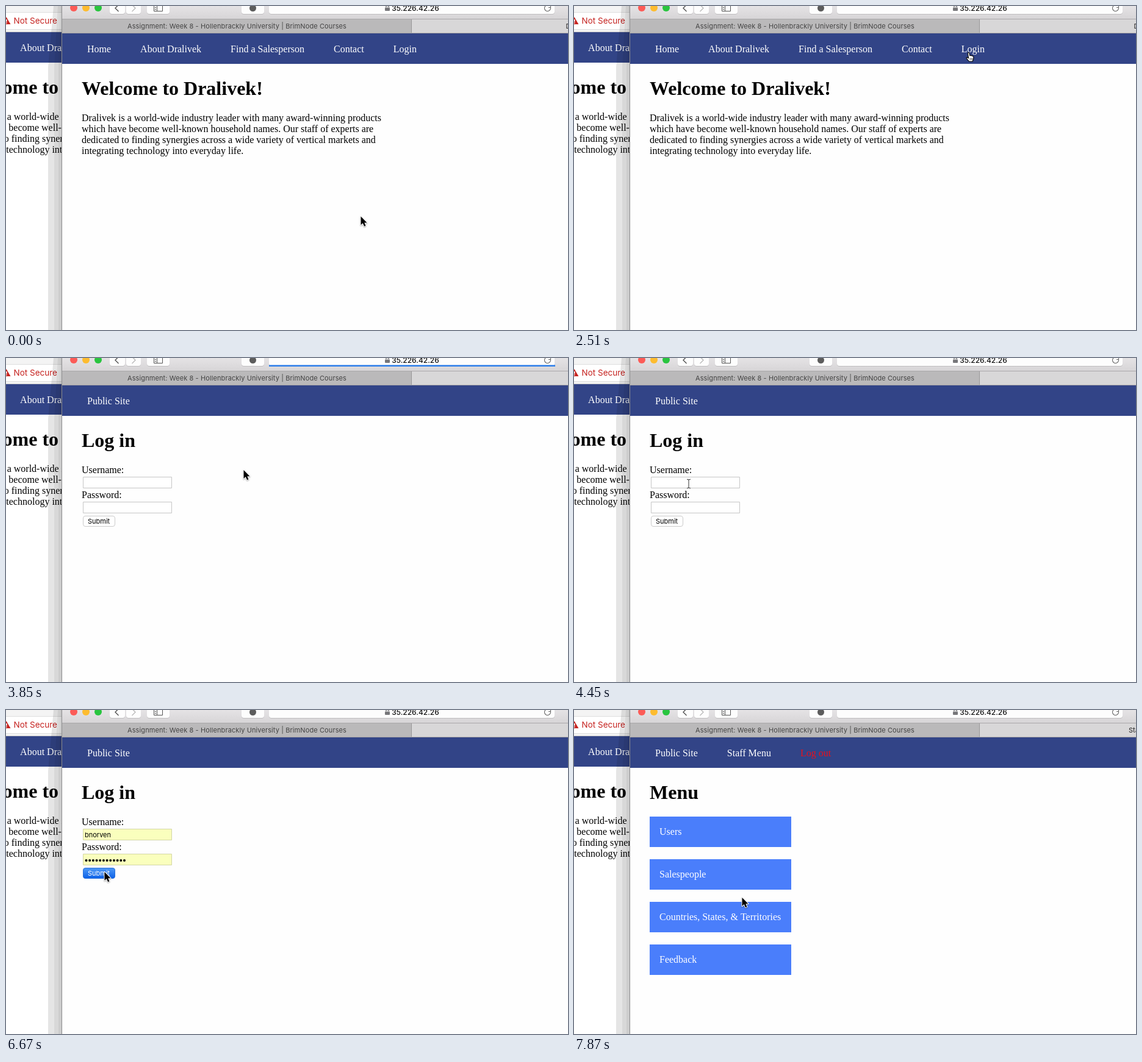
Animation of 921 by 532 pixels, one loop 8 s. Source, as an HTML page with a canvas:

```html
<!DOCTYPE html>
<html lang="en">
<head>
<meta charset="utf-8">
<title>Login walkthrough</title>
<style>
html, body { margin: 0; width: 100%; height: 100%; overflow: hidden; background: #fff; }
canvas { display: block; width: 921px; height: 532px; }
</style>
</head>
<body>
<canvas id="stage" width="921" height="532"></canvas>
<script>
const c = document.getElementById('stage').getContext('2d');
const LOOP = 8000;
const SERIF = '"Liberation Serif", "Times New Roman", serif';
const SANS = 'Inter, Roboto, sans-serif';
const NAVY = '#324487';
const USER = 'bnorven';

const intro = [
  'Dralivek is a world-wide industry leader with many award-winning products',
  'which have become well-known household names. Our staff of experts are',
  'dedicated to finding synergies across a wide variety of vertical markets and',
  'integrating technology into everyday life.'
];
const homeLinks = ['Home', 'About Dralivek', 'Find a Salesperson', 'Contact', 'Login'];

// pointer moves: first step, last step, number of steps, end point
const moves = [
  [740, 1190, 4, 635, 226],
  [1490, 2220, 6, 645.5, 79],
  [3260, 3850, 5, 389.5, 184],
  [4000, 4450, 4, 188, 206.5],
  [5190, 5330, 2, 183.5, 228],
  [5930, 6220, 3, 161.5, 266],
  [6820, 7270, 4, 275.5, 308]
];
// loading bar: time, width, opacity
const barSteps = [
  [0, 0, 0], [2960, 30, 1], [3260, 47, 1], [3400, 65, 1], [3700, 469, 1],
  [4150, 469, .5], [4300, 0, 0], [6820, 30, 1], [7120, 47, 1], [7270, 65, 1],
  [7570, 469, 1], [7720, 469, .5], [7870, 0, 0]
];

const within = (t, a, b) => t >= a && t < b;

function rect(x, y, w, h, fill) {
  c.fillStyle = fill;
  c.fillRect(x, y, w, h);
}

function box(x, y, w, h, r, fill, line) {
  c.beginPath();
  c.roundRect(x, y, w, h, r);
  c.fillStyle = fill;
  c.fill();
  if (line) {
    c.strokeStyle = line;
    c.lineWidth = 1;
    c.stroke();
  }
}

function dot(x, y, r, fill) {
  c.beginPath();
  c.arc(x, y, r, 0, Math.PI * 2);
  c.fillStyle = fill;
  c.fill();
}

function line(points, color, width = 1) {
  c.beginPath();
  points.forEach(([x, y], i) => i ? c.lineTo(x, y) : c.moveTo(x, y));
  c.strokeStyle = color;
  c.lineWidth = width;
  c.stroke();
}

function text(s, x, y, font, color = '#000', align = 'left') {
  c.font = font;
  c.fillStyle = color;
  c.textAlign = align;
  c.fillText(s, x, y);
}

const body = (s, x, y, color) => text(s, x, y, '16px ' + SERIF, color);
const title = s => text(s, 124, 146, 'bold 32px ' + SERIF);
const ui = (s, x, y, size, color) => text(s, x, y, size + 'px ' + SANS, color);

function fade(top, bottom, from, to) {
  const g = c.createLinearGradient(0, top, 0, bottom);
  g.addColorStop(0, from);
  g.addColorStop(1, to);
  return g;
}

function nav(links) {
  rect(92, 45, 829, 50, NAVY);
  let x = 133;
  for (const s of links) {
    body(s, x, 76, s === 'Log out' ? '#e8101c' : '#fff');
    x += c.measureText(s).width + 48;
  }
}

function home() {
  nav(homeLinks);
  title('Welcome to Dralivek!');
  intro.forEach((s, i) => body(s, 124, 189 + 18 * i));
}

function backWindow() {
  c.save();
  c.beginPath();
  c.rect(0, 0, 92, 532);
  c.clip();
  rect(0, 0, 92, 532, '#fff');
  c.save();
  c.translate(-197, -2);
  rect(197, 45, 92, 50, NAVY);
  home();
  c.restore();
  rect(0, 0, 92, 43, '#f4f4f4');
  rect(0, 10, 92, 29, '#dedede');
  rect(0, 11, 92, 27, '#fff');
  rect(0, 42, 92, 1, '#d0d0d0');
  c.beginPath();
  c.moveTo(0.5, 18);
  c.lineTo(7.5, 30);
  c.lineTo(-6.5, 30);
  c.fillStyle = '#c5221f';
  c.fill();
  rect(0, 22, 1.5, 4, '#fff');
  rect(0, 27, 1.5, 1.5, '#fff');
  ui('Not Secure', 12.5, 29, 13.5, '#c5221f');

  // stepped window shadow
  for (const [top, low, a] of [[78, 69, .1], [85, 79, .06], [89, 86, .05]]) {
    c.beginPath();
    c.moveTo(top, 0);
    c.lineTo(low, 100);
    c.lineTo(low, 532);
    c.lineTo(92, 532);
    c.lineTo(92, 0);
    c.fillStyle = `rgba(0,0,0,${a})`;
    c.fill();
  }
  c.restore();
}

function lock(x, y) {
  box(x - 4, y - 1, 8, 5.5, 1, '#77777a');
  c.beginPath();
  c.arc(x, y - 1.5, 2.5, Math.PI, 0);
  c.strokeStyle = '#77777a';
  c.lineWidth = 1.3;
  c.stroke();
}

function reload(x, y) {
  c.beginPath();
  c.arc(x, y, 5, -.3, Math.PI * 1.6);
  c.strokeStyle = '#6a6a6a';
  c.lineWidth = 1.1;
  c.stroke();
  line([[x + 1.5, y - 1], [x + 5, y - 1], [x + 5, y - 5]], '#6a6a6a', 1.1);
}

function chrome(t) {
  rect(92, 0, 829, 22, fade(0, 22, '#e5e3e5', '#d6d4d6'));
  ['#fc5b57', '#fdbc2f', '#29c53f'].forEach((col, i) => dot(111 + 20 * i, 3, 6, col));
  for (const [x, w] of [[170, 25], [197, 24], [231, 37], [386, 37], [431, 468]]) {
    box(x, -9, w, 23, 4, '#bfbdbf');
    box(x, -9, w, 22, 4, '#fdfdfd');
  }
  line([[184.5, -2], [179, 3.5], [184.5, 9]], '#555', 1.4);
  line([[206.5, -2], [212, 3.5], [206.5, 9]], '#bbb', 1.4);
  line([[242.5, -2], [242.5, 8.5], [256.5, 8.5], [256.5, -2]], '#555');
  line([[247.5, -2], [247.5, 8.5]], '#555');
  line([[244, 2.5], [246, 2.5]], '#555');
  line([[244, 5.5], [246, 5.5]], '#555');
  dot(404.5, 3.5, 5.5, '#5c5c5c');
  lock(625, 3.5);
  text('35.226.42.26', 671, 8, '500 12px ' + SANS, '#111', 'center');

  if (within(t, 2960, 3850) || within(t, 6820, 7720)) {
    line([[882.5, -1], [892.5, 9]], '#666', 1.1);
    line([[892.5, -1], [882.5, 9]], '#666', 1.1);
  } else reload(887.5, 3.5);

  const [, w, alpha] = barSteps.filter(s => s[0] <= t).pop();
  c.globalAlpha = alpha;
  rect(431, 11.5, w, 2.5, '#2b7de9');
  c.globalAlpha = 1;

  rect(92, 21, 829, 1, '#aaa8aa');
  rect(92, 22, 573, 22, '#bab9ba');
  rect(665, 22, 256, 22, '#d8d7d8');
  rect(664, 22, 1, 22, '#989798');
  rect(92, 44, 829, 1, '#a3a2a5');
  c.letterSpacing = '0.1px';
  text('Assignment: Week 8 - Hollenbrackly University | BrimNode Courses',
    378.5, 37, '11px ' + SANS, '#444', 'center');
  c.letterSpacing = '0px';
  if (t < 3400) ui('Dralivek', 917.5, 37, 11, '#222');
  if (t >= 7420) ui('Staff', 909, 37, 11, '#222');
}

function field(y, filled) {
  box(126.5, y + .5, 145, 18, 0, filled ? '#faffbd' : '#fff', filled ? '#d3d6a6' : '#c6c6c6');
}

function bigKey(x, y) {
  c.fillStyle = fade(y, y + 30, '#f4f4f4', '#a9abad');
  c.beginPath();
  c.arc(x, y + 8, 8, 0, Math.PI * 2);
  c.fill();
  c.beginPath();
  c.moveTo(x - 3, y + 14);
  c.lineTo(x + 3, y + 14);
  c.lineTo(x + 3, y + 26);
  c.lineTo(x, y + 29);
  c.lineTo(x - 3, y + 26);
  c.fill();
  box(x - 3.5, y + 2.5, 7, 3.5, 1.7, '#6f7d8f');
  rect(x, y + 15, 1, 11, '#85888c');
  rect(x + 3, y + 20, 2, 2, '#c4c6c8');
  rect(x + 3, y + 24, 2, 2, '#b4b6b8');
}

function suggestions(lit) {
  c.save();
  c.shadowColor = 'rgba(0,0,0,.3)';
  c.shadowBlur = 10;
  c.shadowOffsetY = 3;
  box(126, 216, 146, 70.5, [0, 0, 5, 5], '#ececec');
  c.restore();
  box(125.5, 215.5, 147, 71, [0, 0, 5, 5], '#ececec', '#c2c2c2');
  if (lit) rect(126, 216, 146, 43, '#4697fc');
  bigKey(150, 223);
  ui(USER, 168, 234, 12.5, lit ? '#fff' : '#2b2b2b');
  ui('From this site', 168, 250, 11, lit ? '#eaf3ff' : '#777');
  ui('Other Passwords...', 142, 277, 12.5, '#333');
}

function login(t) {
  const filled = t >= 5630, pressed = t >= 6670;
  nav(['Public Site']);
  title('Log in');
  body('Username:', 124, 189);
  body('Password:', 124, 230);
  if (within(t, 4890, 6670)) box(123.5, 192.5, 151, 24, 3, '#b9d9fb');
  field(195, filled);
  field(236, filled);
  if (filled) {
    ui(USER, 129, 209, 11);
    for (let i = 0; i < 12; i++) dot(131.5 + 5.68 * i, 247, 2, '#000');
  }
  box(126.5, 259.5, 52, 17, 3.5, pressed ? fade(259, 277, '#4f9bf7', '#0a5fe8') : '#fff',
    pressed ? '#2a6fd8' : '#cbcbcb');
  ui('Submit', 134, 272, 11, pressed ? '#fff' : '#000');
  if (within(t, 4890, 5630)) {
    dot(255, 201.5, 3, '#111');
    rect(254, 203, 2.2, 7, '#111');
    line([[260, 203], [263.3, 206.3], [266.6, 203]], '#111', 1.5);
    suggestions(t >= 5190);
  }
}

function menu() {
  nav(['Public Site', 'Staff Menu', 'Log out']);
  title('Menu');
  ['Users', 'Salespeople', 'Countries, States, & Territories', 'Feedback'].forEach((s, i) => {
    rect(124, 175 + 70 * i, 232, 50, '#4a7efb');
    body(s, 140, 205 + 70 * i, '#fff');
  });
}

const arrowShape = new Path2D('M0 0V14L3.2 11L5.6 16.2L8 15.2L5.8 10.2H10Z');
const handShape = new Path2D('M4 3Q4 1.3 5.2 1.3Q6.4 1.3 6.6 3L7.2 6.5Q8 5.4 9.1 6.6' +
  'Q10.4 5.8 11.2 7.2Q12.9 6.7 13.3 8.6L13.1 12L11.6 16H6L2 11.3Q1 9.6 2.6 9.2L5 10.8Z');

function pointerAt(t) {
  let x = 581.5, y = 345.5;
  for (const [start, end, n, tx, ty] of moves) {
    if (t < start) break;
    const gap = (end - start) / (n - 1);
    const f = Math.min(n, Math.floor((t - start) / gap + .001) + 1) / n;
    x += (tx - x) * f;
    y += (ty - y) * f;
  }
  return [x, y];
}

function pointer(t) {
  const [x, y] = pointerAt(t);
  c.save();
  c.translate(x, y);
  c.lineJoin = 'round';
  if (within(t, 2510, 3260)) {
    c.translate(-4, -4);
    c.fillStyle = '#fff';
    c.fill(handShape);
    c.strokeStyle = '#000';
    c.lineWidth = 1.1;
    c.stroke(handShape);
    for (const px of [7.5, 9.5, 11.3]) line([[px, 10.5], [px, 13.5]], '#000', .7);
  } else if (within(t, 4450, 5190) || within(t, 5630, 6220)) {
    line([[-3, -7.5], [0, -6.5], [3, -7.5]], '#333');
    line([[0, -6.5], [0, 6.5]], '#333');
    line([[-3, 7.5], [0, 6.5], [3, 7.5]], '#333');
  } else {
    c.shadowColor = 'rgba(0,0,0,.35)';
    c.shadowBlur = 2;
    c.shadowOffsetY = 1;
    c.strokeStyle = '#fff';
    c.lineWidth = 2;
    c.stroke(arrowShape);
    c.shadowColor = 'transparent';
    c.fillStyle = '#000';
    c.fill(arrowShape);
  }
  c.restore();
}

function draw(t) {
  backWindow();
  rect(92, 0, 829, 532, '#fefefe');
  chrome(t);
  if (t < 3400) home();
  else if (t < 7120) login(t);
  else menu();
  rect(91, 0, 1, 532, '#8c8c8e');
  pointer(t);
}

const begin = performance.now();
function tick() {
  draw((performance.now() - begin) % LOOP);
  requestAnimationFrame(tick);
}
tick();
</script>
</body>
</html>
```
